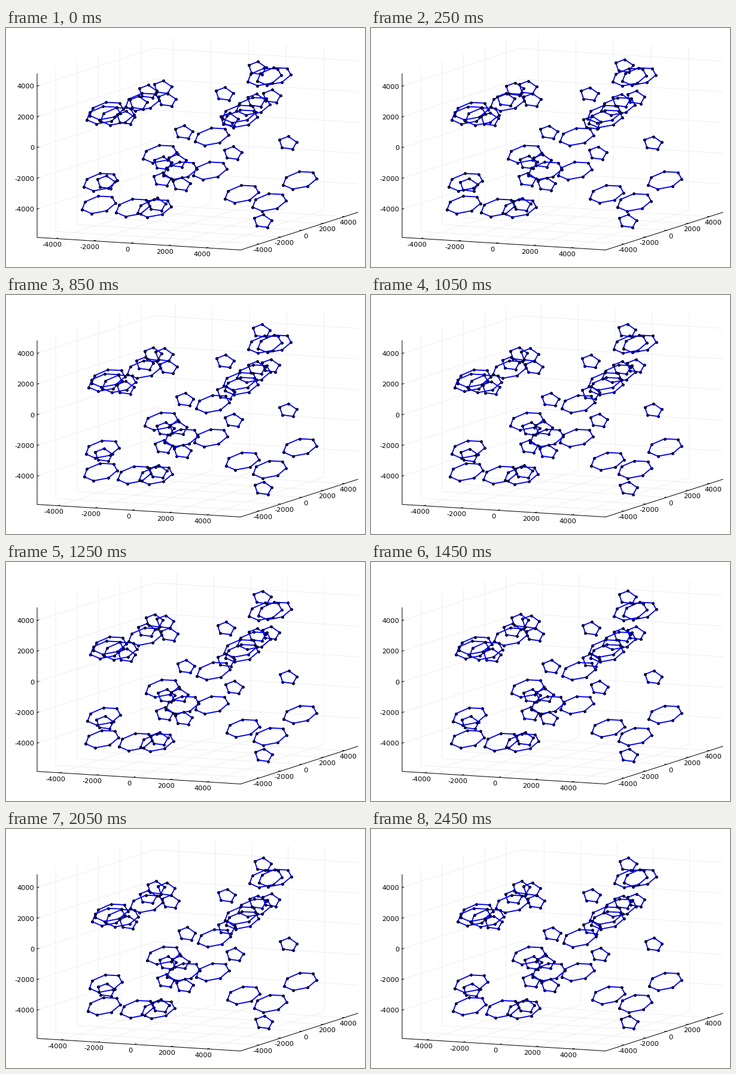
These frames come from a looping animation (600 by 400 pixels, 2.5 s). A matplotlib script:

```python
import numpy as np
import matplotlib.pyplot as plt
from matplotlib.animation import FuncAnimation

W, H, DPI = 600, 400, 100
PX = 72 / DPI
FRAMES, STEP = 50, 50

# Projected box in pixels: front left corner and the three edges.
CORNER = np.array([52, 350])
EDGES = np.array([[340, 21], [196, -63], [0, -274]])
VALUES = np.arange(-4000, 4001, 2000)

# Key points: polygon centres at the start.
HEPTAGONS = [
    (155, 295), (212, 300), (248, 301), (158, 257), (257, 210), (291, 238),
    (341, 238), (344, 181), (394, 277), (440, 291), (491, 254), (448, 80),
    (432, 81), (228, 123), (168, 138), (163, 145), (186, 147), (413, 130),
    (390, 143), (392, 151),
]
PENTAGONS = [
    (297, 174), (365, 110), (379, 209), (471, 192), (429, 323), (262, 99),
    (269, 120), (418, 121), (286, 222), (261, 253), (293, 261), (252, 295),
]
# Moving pentagons: centre and distance, all along one slanted direction.
MOVERS = [
    (420, 67, 9.5), (237, 106, 9.5), (221, 125, 13), (167, 258, -10.5),
    (373, 153, -11), (200, 150, -5), (262, 226, 3), (444, 114, -4),
]
HEADING = np.array([0.75, -1])


def ring(n, a, b):
    """Closed polygon of n corners on the ellipse spanned by a and b."""
    t = np.linspace(0, 2 * np.pi, n + 1)
    return np.outer(np.cos(t), a) + np.outer(np.sin(t), b)


HEPTAGON = ring(7, (-27.8, 8.3), (7, 12.6))
PENTAGON = ring(5, (-14.1, -5.3), (5.5, -9.9))


def settle(t, tau):
    return 1 - np.exp(-max(t, 0) / tau)


def limits(t):
    """Axis limits; x grows to the left and z grows upward."""
    return [(-5006 - 423 * settle(t - 515, 1080), 5816),
            (-5747, 5242),
            (-5846, 4798 + 47 * settle(t, 900))]


def tick_positions(t):
    return [(VALUES - lo) / (hi - lo) for lo, hi in limits(t)]


def project(*uvw):
    return CORNER + np.array(uvw) @ EDGES


def rescale(points, t):
    """Shift screen points as the axis limits grow."""
    (x0, x1), _, (z0, z1) = limits(t)
    (a0, a1), _, (b0, b1) = limits(0)
    shrink = 1 - (a1 - a0) / (x1 - x0)
    drop = 1 - (b1 - b0) / (z1 - z0)
    # Points further left on the stage lie further from the fixed x limit.
    mid = points.mean(axis=0)
    far = np.clip(0.88 - 0.0024 * (mid[0] - 155), 0.05, 0.88)
    reach = far - (points[:, :1] - mid[0]) / EDGES[0, 0]
    height = (CORNER[1] - mid[1]) / -EDGES[2, 1]
    return points + shrink * reach * EDGES[0] - drop * height * EDGES[2]


def shapes(t):
    still = [HEPTAGON + c for c in HEPTAGONS] + [PENTAGON + c for c in PENTAGONS]
    moved = [PENTAGON + (x, y) + d * settle(t, 430) * HEADING
             for x, y, d in MOVERS]
    return join([rescale(p, t) for p in still + moved])


def join(paths):
    """Stack polylines with gaps between them."""
    gap = [[np.nan, np.nan]]
    return np.vstack([part for p in paths for part in (p, gap)]).T


fig = plt.figure(figsize=(W / DPI, H / DPI), dpi=DPI, facecolor="white")
ax = fig.add_axes([0, 0, 1, 1])
ax.set_xlim(0, W)
ax.set_ylim(H - 0.5, -0.5)
ax.axis("off")

outline = [project(0, 0, 1), project(0, 0, 0), project(1, 0, 0), project(1, 1, 0)]
ax.plot(*np.transpose(outline), color="black", lw=PX, zorder=2)
grid, = ax.plot([], [], color="black", alpha=0.065, lw=PX, zorder=1)
marks, = ax.plot([], [], color="black", lw=PX, zorder=2)
body, = ax.plot([], [], color="#0000ff", lw=1.9 * PX, zorder=3, marker="o",
                ms=3.8 * PX, mfc="#0000c8", mec="black", mew=1.1 * PX)


def labels(ha):
    return [ax.text(0, 0, str(v), ha=ha, fontsize=8.2, family="DejaVu Sans")
            for v in VALUES]


x_labels, y_labels, z_labels = labels("center"), labels("center"), labels("right")


def put(texts, points, offset):
    for text, p in zip(texts, points):
        text.set_position(p + np.array(offset))


def draw(i):
    t = i * STEP
    xs, ys, zs = tick_positions(t)
    lines = [[project(u, 0, 0), project(u, 1, 0), project(u, 1, 1)] for u in xs]
    lines += [[project(1, v, 0), project(0, v, 0), project(0, v, 1)] for v in ys]
    lines += [[project(0, 0, w), project(0, 1, w), project(1, 1, w)] for w in zs]
    grid.set_data(*join(lines))

    short = [[project(u, 0, 0), project(u, .015, 0)] for u in xs]
    short += [[project(1, v, 0), project(.99, v, 0)] for v in ys]
    short += [[project(0, 0, w), project(0, .015, w)] for w in zs]
    marks.set_data(*join(short))

    put(x_labels, [project(u, 0, 0) for u in xs], (-6.7, 13.7))
    put(y_labels, [project(1, v, 0) for v in ys], (6.2, 13.3))
    put(z_labels, [project(0, 0, w) for w in zs], (-4.9, 4.2))
    body.set_data(*shapes(t))
    return [grid, marks, body]


anim = FuncAnimation(fig, draw, frames=FRAMES, interval=STEP, repeat=True,
                     repeat_delay=0, blit=False)
plt.show()
```
